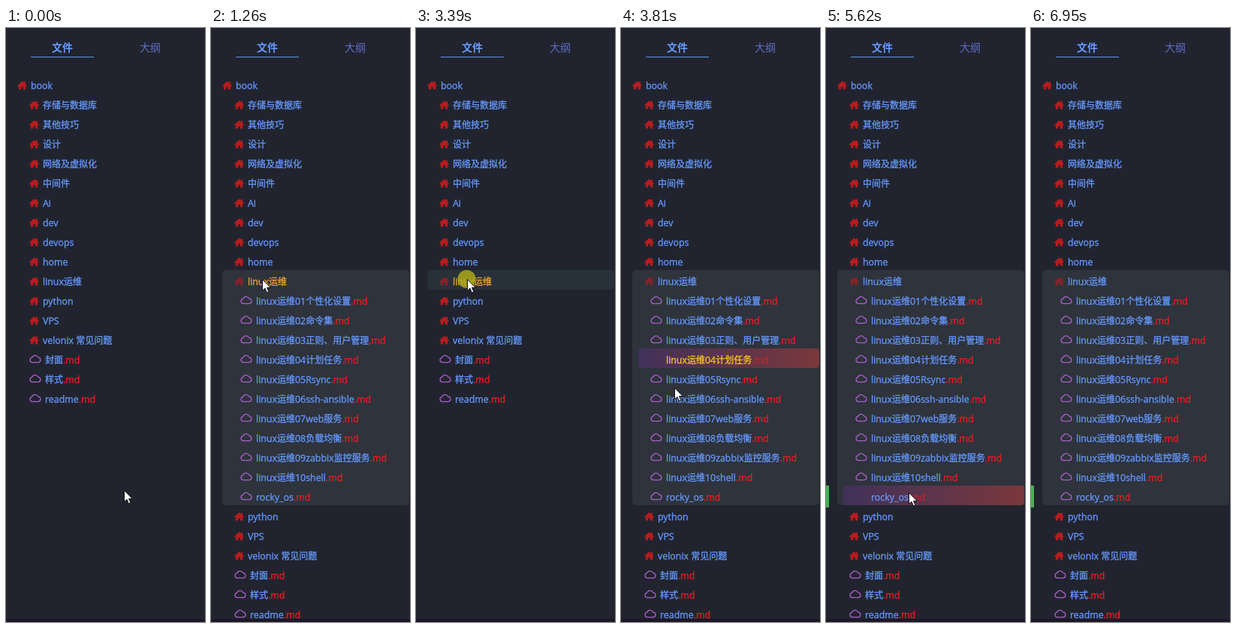
Write an HTML page with a canvas that moves like this. It is 265x788 px and loops after 7540 ms.

```html
<!DOCTYPE html>
<html lang="zh">
<head>
<meta charset="utf-8">
<style>
  html, body { margin: 0; width: 100%; height: 100%; overflow: hidden; background: #21242e; }
  canvas { display: block; }
</style>
</head>
<body>
<canvas id="stage" width="265" height="788"></canvas>
<script>
const ctx = document.getElementById('stage').getContext('2d');
const LOOP = 7540, ROW = 26, TOP = 61, STEP = 67, PRESS = 130;
const BLUE = '#6699ff';
const CJK = '"Noto Sans CJK SC", "Noto Sans CJK", sans-serif';
const LATIN = '"Open Sans", "Noto Sans", sans-serif';

const folders = ['存储与数据库', '其他技巧', '设计', '网络及虚拟化', '中间件', 'Ai', 'dev', 'devops', 'home', 'linux运维'];
const notes = ['01个性化设置', '02命令集', '03正则、用户管理', '04计划任务', '05Rsync', '06ssh-ansible',
  '07web服务', '08负载均衡', '09zabbix监控服务', '10shell'].map(s => 'linux运维' + s).concat('rocky_os');
const moreFolders = ['python', 'VPS', 'velonix 常见问题'];
const rootFiles = ['封面', '样式', 'readme'];

const folder = (name, left = 31) => ({ name, left });
const file = left => name => ({ name, left, md: true });
const treeRows = open => [
  folder('book', 15),
  ...folders.map(n => folder(n)),
  ...(open ? notes.map(file(39)) : []),
  ...moreFolders.map(n => folder(n)),
  ...rootFiles.map(file(31)),
];
const closedTree = treeRows(false), openTree = treeRows(true);

const easeIn = p => u => u ** p;
const easeOut = p => u => 1 - (1 - u) ** p;
const easeInOut = p => u => u < .5 ? (2 * u) ** p / 2 : 1 - (2 - 2 * u) ** p / 2;
const linear = easeIn(1);

// Each pointer move begins where the one before it ended
const home = { x: 157, y: 613 };
const moves = [
  { start: 390, steps: 9, x: 68, y: 333, easeX: easeInOut(4), easeY: easeInOut(4) },
  { start: 3670, steps: 7, x: 111, y: 634, easeX: easeIn(3), easeY: easeOut(1.16) },
  { start: 4280, steps: 3, x: 110, y: 616, easeX: linear, easeY: linear },
  { start: 6070, steps: 5, x: -20, y: 611, easeX: linear, easeY: linear },
  { start: 6680, steps: 5, x: 40, y: 790, easeX: linear, easeY: linear },
];
const toggles = [1130, 2250, 3390], select = 4680;

function pointerAt(t) {
  let { x, y } = home;
  for (const move of moves) {
    if (t < move.start) break;
    const u = Math.min(1, (1 + Math.floor((t - move.start) / STEP)) / move.steps);
    x += (move.x - x) * move.easeX(u);
    y += (move.y - y) * move.easeY(u);
  }
  return { x: Math.round(x), y: Math.round(y) };
}

// The highlight trails the pointer by one step
function hoveredRow(t, pointer) {
  const { x, y } = pointerAt(t - STEP);
  return x >= 15 && pointer.y < 784 ? Math.floor((y - TOP) / ROW) : -1;
}

const house = new Path2D('M0 6.4 6.5 .6 9 2.8V1.2H11V4.6L13 6.4 12.2 7.4 11.2 6.6V11.6H7.8V8.2H5.2V11.6H1.8V6.6L.8 7.4Z');
const cloud = new Path2D('M4 10.2A3.3 3.3 0 0 1 3.6 3.7 4.4 4.4 0 0 1 11.6 3.3 3.5 3.5 0 0 1 12.2 10.2Z');
const arrow = new Path2D('M.5.5V15.6L4 12.3 6.4 18 8.9 17 6.5 11.5H11.2Z');

function box(x, y, w, h, fill, radius = 0) {
  ctx.fillStyle = fill;
  ctx.beginPath();
  ctx.roundRect(x, y, w, h, radius);
  ctx.fill();
}

function icon(path, x, y, { fill, stroke, width = 1 }) {
  ctx.save();
  ctx.translate(x, y);
  if (fill) {
    ctx.fillStyle = fill;
    ctx.fill(path);
  }
  if (stroke) {
    ctx.strokeStyle = stroke;
    ctx.lineWidth = width;
    ctx.stroke(path);
  }
  ctx.restore();
}

// Draws mixed Latin and Chinese text, slightly thickened, and returns its right end
function label(text, x, y, color) {
  ctx.fillStyle = ctx.strokeStyle = color;
  ctx.lineWidth = .3;
  for (const run of text.match(/[ -~]+|[^ -~]+/g)) {
    ctx.font = /[ -~]/.test(run) ? '12.4px ' + LATIN : '12px ' + CJK;
    ctx.fillText(run, x, y);
    ctx.strokeText(run, x, y);
    x += ctx.measureText(run).width;
  }
  return x;
}

function drawHeader() {
  ctx.font = 'bold 14px ' + CJK;
  ctx.fillStyle = BLUE;
  ctx.fillText('文件', 61, 31);
  ctx.font = '14px ' + CJK;
  ctx.fillStyle = '#5f6cc4';
  ctx.fillText('大纲', 178, 31);
  box(33, 38, 84, 1, '#5a96e6');
}

function drawFile({ name, left }, y, hovered, color) {
  if (hovered) {
    const x = left - 16, shade = ctx.createLinearGradient(x, 0, 264, 0);
    shade.addColorStop(0, '#41315a');
    shade.addColorStop(1, '#7a383b');
    box(x, y, 264 - x, ROW, shade, 4);
  } else {
    icon(cloud, left, y + 8.5, { stroke: '#a75fc6', width: 1.3 });
  }
  const end = label(name, left + 21, y + 20, color);
  label('.md', end, y + 20, hovered ? '#c0272f' : '#f01c20');
}

function drawTree(open, hoverIndex) {
  const groupIndex = folders.length;
  const rows = open ? openTree : closedTree;
  if (open) box(15, TOP + groupIndex * ROW, 249, ROW * (notes.length + 1), '#2e333c', 5);
  rows.forEach((row, i) => {
    const y = TOP + i * ROW, hovered = i === hoverIndex, isGroup = i === groupIndex;
    const lit = hovered && row.name.startsWith('linux');
    if (row.md) return drawFile(row, y, hovered, lit ? '#ffc81e' : BLUE);
    if (hovered && !(open && isGroup)) box(15, y, 249, ROW, '#283039', 5);
    icon(house, row.left, y + 9, { fill: isGroup && (open || hovered) ? '#81242a' : '#b71c1f' });
    label(row.name, row.left + 18, y + 20, lit ? '#f5a623' : BLUE);
  });
}

function render() {
  const t = performance.now() % LOOP;
  const pointer = pointerAt(t);
  const open = toggles.filter(start => t >= start + PRESS).length % 2 === 1;
  const pressed = [...toggles, select].some(start => t >= start && t < start + PRESS);

  box(0, 0, 265, 788, '#21242e');
  drawHeader();
  drawTree(open, hoveredRow(t, pointer));
  if (t >= 5620) box(0, 607, 4, 29, '#4caf50');
  box(0, 784, 265, 4, '#1e1728');
  if (pressed) box(pointer.x - 12.5, pointer.y - 12, 24, 24, 'rgba(176,172,24,.83)', 12);
  icon(arrow, pointer.x, pointer.y, { fill: '#fff', stroke: '#111' });
  requestAnimationFrame(render);
}
render();
</script>
</body>
</html>
```
